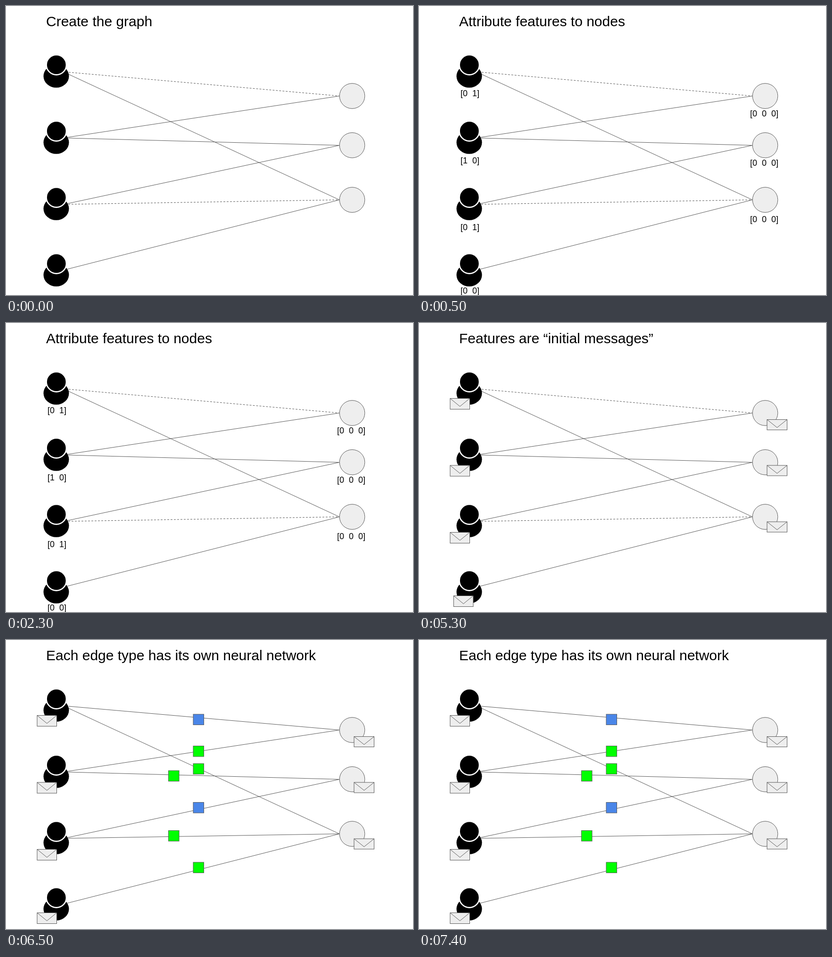
These frames come from a looping animation (863x615 px, 8000 ms). An HTML page:

```html
<!DOCTYPE html>
<html lang="en">
<head>
<meta charset="utf-8">
<title>Message passing on a graph</title>
<style>
  html, body { margin: 0; width: 100%; height: 100%; overflow: hidden; background: #fff; }
  svg { display: block; width: 863px; height: 615px; }
  text { font-family: "Liberation Sans", Arial, sans-serif; white-space: pre; }
  .title { font-size: 30px; }
  .label { font-size: 18px; }
  .edge, .flap { fill: none; stroke: #595959; }
  .node, .mail { fill: #eee; stroke: #595959; }
  .box { stroke: #595959; }
  .head { stroke: #fff; stroke-width: 2.6; }
</style>
</head>
<body>
<svg id="stage" viewBox="0 0 863 615"></svg>
<script>
const stage = document.getElementById('stage');
const LOOP = 8000;
const SCENES = [
  { at: 0, title: 'Create the graph' },
  { at: 500, title: 'Attribute features to nodes' },
  { at: 3500, title: 'Features are “initial messages”' },
  { at: 6500, title: 'Each edge type has its own neural network' }
];
const BLUE = '#4a86e8', GREEN = '#0f0';

function add(parent, tag, attrs, text) {
  const el = document.createElementNS('http://www.w3.org/2000/svg', tag);
  for (const key in attrs) el.setAttribute(key, attrs[key]);
  if (text) el.textContent = text;
  parent.append(el);
  return el;
}
const group = () => add(stage, 'g', {});

// Edges: start, end, dashed until the last scene
const edges = group();
const dashed = [];
[
  [133, 141, 191.5, true], [131, 144.5, 412.5], [130, 279.5, 191.5], [132, 281, 296.5],
  [130, 420.5, 296.5], [132, 422, 412.5, true], [130, 560, 412.5]
].forEach(([x1, y1, y2, dash]) => {
  const line = add(edges, 'line', { class: 'edge', x1, y1, x2: 707, y2 });
  if (dash) dashed.push(line);
});

const nodes = group();
for (let i = 0; i < 4; i++) {
  const y = 141 * i;
  add(nodes, 'ellipse', { cx: 106.5, cy: 149.3 + y, rx: 27, ry: 24.5 });
  add(nodes, 'circle', { class: 'head', cx: 106.8, cy: 125.2 + y, r: 21.2 });
}
for (const cy of [191.5, 296.3, 412.5]) {
  add(nodes, 'circle', { class: 'node', cx: 734, cy, r: 26.8 });
}

const labels = group();
[['[0  1]', 192], ['[1  0]', 335], ['[0  1]', 477], ['[0  0]', 612]]
  .forEach(([s, y]) => add(labels, 'text', { class: 'label', x: 88, y }, s));
for (const y of [235, 340, 460]) {
  add(labels, 'text', { class: 'label', x: 702, y }, '[0  0  0]');
}

const mails = group();
function mail(x, y, w, h) {
  const g = add(mails, 'g', { transform: `translate(${x} ${y})` });
  add(g, 'rect', { class: 'mail', width: w, height: h });
  add(g, 'path', { class: 'flap', d: `M0 0L${w / 2} 17L${w} 0` });
  return g;
}
const [, , , lastMail] = [160.5, 303, 445.5, 580.5].map(y => mail(66, y, 41.5, 23));
[205.5, 303, 423].forEach(y => mail(738, y, 42.5, 22));

const boxes = group();
[
  [397, 158, BLUE], [397, 225.5, GREEN], [397, 263, GREEN], [344.5, 278, GREEN],
  [397, 345.5, BLUE], [344.5, 405.5, GREEN], [397, 473, GREEN]
].forEach(([x, y, fill]) => add(boxes, 'rect', { class: 'box', x, y, width: 22.5, height: 22.5, fill }));

const title = add(stage, 'text', { class: 'title', x: 85, y: 43 });

const show = (el, on) => el.setAttribute('visibility', on ? 'visible' : 'hidden');
let current = -1;

function setScene(n) {
  title.textContent = SCENES[n].title;
  show(labels, n === 1);
  show(mails, n >= 2);
  show(boxes, n === 3);
  lastMail.setAttribute('transform', `translate(${n === 2 ? 73.5 : 66} 580.5)`);
  dashed.forEach(line => line.setAttribute('stroke-dasharray', n === 3 ? 'none' : '4 3'));
}

const start = performance.now();
function tick() {
  const t = (performance.now() - start) % LOOP;
  const n = SCENES.filter(s => s.at <= t).length - 1;
  if (n !== current) setScene(current = n);
  requestAnimationFrame(tick);
}
tick();
</script>
</body>
</html>
```
